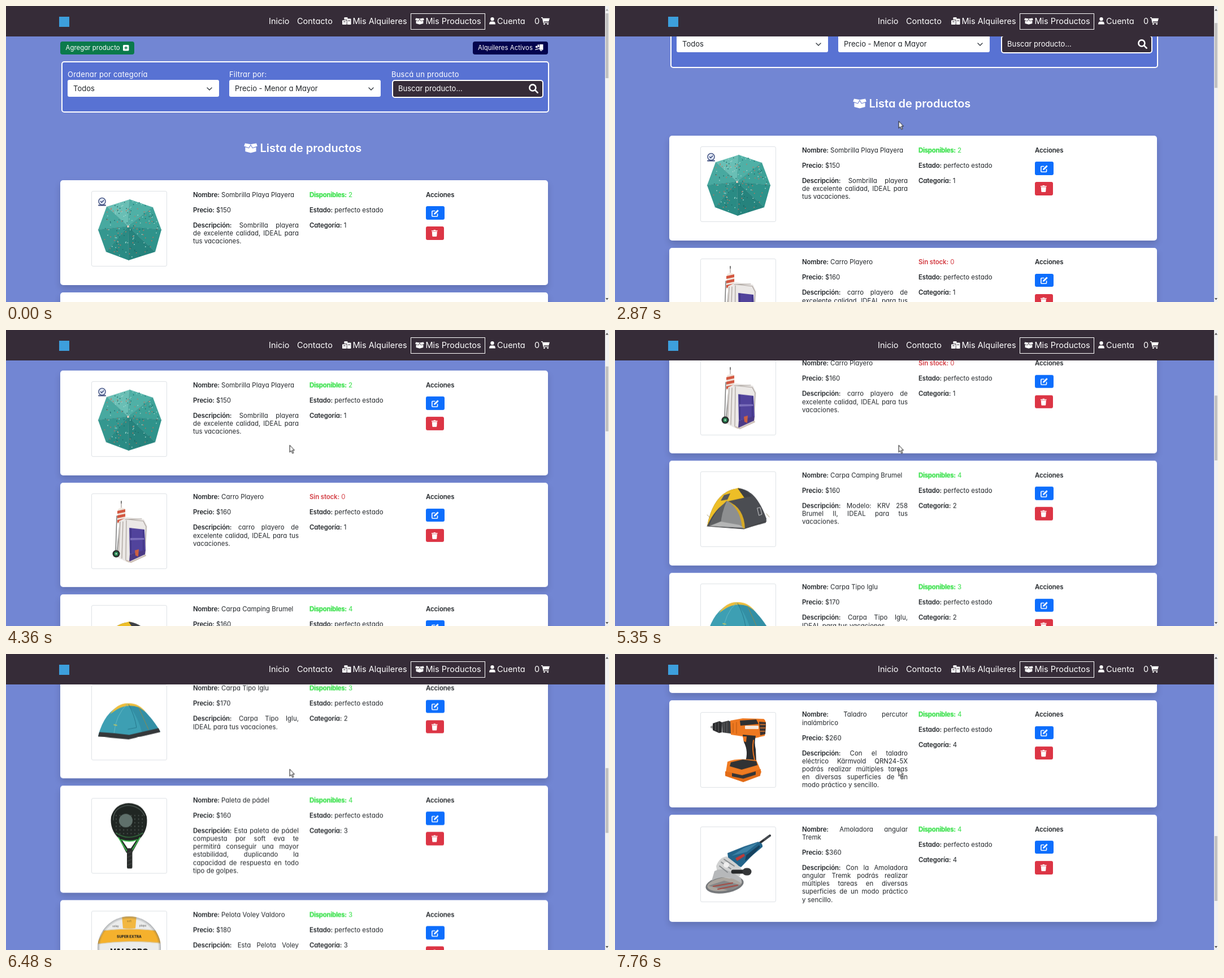
An HTML page for the animation above (8 s loop, 1067 px wide and 525 px high).

```html
<!DOCTYPE html>
<html lang="es">
<head>
<meta charset="utf-8">
<title>Mis Productos</title>
<style>
html, body { margin: 0; width: 100%; height: 100%; overflow: hidden; background: #7286d3; }
body { position: relative; font: 11.4px Inter, "Open Sans", sans-serif; font-feature-settings: "cv11"; letter-spacing: .003em; color: #212529; }
div, svg { position: absolute; box-sizing: border-box; }
svg { overflow: visible; }
b { font-weight: 600; letter-spacing: -.01em; }
#page { left: 0; top: 0; width: 1060px; height: 1960px; }
#head { left: 0; top: 0; width: 1060px; height: 54px; background: #362c38; }
#bar { left: 1060px; top: 0; width: 7px; height: 525px; background: #f1f1f1; }
#thumb { left: 1px; top: 13px; width: 5px; height: 115px; background: #c1c1c1; }
/* zero line height: the top offset is the baseline */
.t { line-height: 0; margin-top: -.364em; white-space: nowrap; }
.w { color: #fff; }
.nav { font-size: 14.5px; letter-spacing: 0; color: #fff; }
.label { font-size: 13px; letter-spacing: .015em; color: #fff; }
.field { font-size: 13px; letter-spacing: 0; }
.title { font-size: 20px; font-weight: 600; letter-spacing: 0; color: #fff; }
.full { width: 187px; text-align-last: justify; }
.in { color: #4ce45c; font-weight: 500; }
.in b { font-weight: 700; letter-spacing: -.025em; text-shadow: 0 0 1px #4ce45c; }
.out { color: #d33a40; }
.card { left: 96px; width: 863px; background: #fff; border-radius: 5px; box-shadow: 0 6px 12px rgba(0,0,0,.15); }
.frame { border: 1px solid #dee2e6; border-radius: 3px; background: #fff; }
</style>
</head>
<body>
<div id="page"></div>
<div id="head"></div>
<div id="bar">
  <div id="thumb"></div>
  <svg width="7" height="525"><path id="up" d="M1 8.5L3.5 5 6 8.5z"/><path d="M1 518L3.5 521.5 6 518z" fill="#505050"/></svg>
</div>
<svg id="cursor" width="10" height="17" viewBox="0 0 10 17"><path d="M.6.8V13.2L3.3 10.6 5.4 15.4 7.4 14.5 5.3 9.8H9z" fill="#fff" stroke="#111" stroke-width="1"/></svg>
<script>
const $ = id => document.getElementById(id);
const box = (x, y, w, h, css, cls = '') =>
  `<div class="${cls}" style="left:${x}px;top:${y}px;width:${w}px;height:${h}px;${css}"></div>`;
const text = (x, y, str, cls = '') => `<div class="t ${cls}" style="left:${x}px;top:${y}px">${str}</div>`;
const path = (d, fill, more = '') => `<path d="${d}" fill="${fill}" ${more}/>`;
const poly = (pts, fill) => path(`M${pts}Z`, fill);
const line = (d, color, width) =>
  path(d, 'none', `stroke="${color}" stroke-width="${width}" stroke-linecap="round" stroke-linejoin="round"`);
const dot = (x, y, r, fill) => `<circle cx="${x.toFixed(1)}" cy="${y.toFixed(1)}" r="${r}" fill="${fill}"/>`;
const ring = (x, y, r, color, width) => `<circle cx="${x}" cy="${y}" r="${r}" fill="none" stroke="${color}" stroke-width="${width}"/>`;
const rect = (x, y, w, h, fill, rx = 0) => `<rect x="${x}" y="${y}" width="${w}" height="${h}" rx="${rx}" fill="${fill}"/>`;
const ink = 'currentColor';

let seed = 7;
const rand = () => (seed = seed * 16807 % 2147483647) / 2147483647;

// name: [width, height, markup]
const icons = {
  open: [24, 18, path('M2 .6L12 2.2 8.5 8.2.2 5.6zM22 .6L12 2.2 15.5 8.2 23.8 5.6zM2.4 7.4L9 9.4 12 4.6 15 9.4 21.6 7.4V15L12 17.6 2.4 15z', ink)],
  boxes: [18, 15, rect(4, 0, 7, 5, ink, 1) + rect(0, 6, 9, 9, ink, 1) + rect(10, 3, 8, 12, ink, 1)
    + rect(2.5, 8.5, 4, 1.3, '#362c38') + rect(12, 6.5, 4, 1.3, '#362c38')],
  user: [14, 16, dot(7, 4, 4, ink) + path('M0 16Q0 9.5 5 9.5H9Q14 9.5 14 16z', ink)],
  cart: [18, 16, path('M0 0H3L3.6 2H18L16 9H5.5L5.8 10.7H16V12.3H4.4L2.2 1.7H0z', ink) + dot(6.5, 14.4, 1.6, ink) + dot(14, 14.4, 1.6, ink)],
  plus: [14, 14, rect(0, 0, 14, 14, ink, 2) + line('M7 4V10M4 7H10', '#0b7a4b', 1.8)],
  truck: [18, 15, path('M10 0H18V12H10z', ink) + dot(13.5, 12.5, 2.4, ink) + dot(13.5, 12.5, 1, '#03034d')
    + poly('1 4 5 3 6 7 2 8', ink) + poly('5.5 1 8.5 .3 9.3 5.8 6.5 6.5', ink) + line('M1 11.5L10 9.3', ink, 1.6)],
  search: [16, 16, ring(6.5, 6.5, 5.2, ink, 2.4) + line('M10.5 10.5L14.8 14.8', ink, 2.4)],
  down: [10, 6, line('M1 1L5 5 9 1', ink, 1.4)],
  edit: [16, 16, line('M7 3H2.5Q1 3 1 4.5V13.5Q1 15 2.5 15H11.5Q13 15 13 13.5V9.5', ink, 2) + path('M4.8 11.2L5.5 8 12.4 1.1Q13.2.4 14 1.1L15 2.1Q15.7 2.9 15 3.7L8 10.5z', ink)],
  trash: [14, 16, path('M0 1.4H4.5L5.2 0H8.8L9.5 1.4H14V3.2H0zM1 4.3H13L12.2 14.7Q12.1 16 10.8 16H3.2Q1.9 16 1.8 14.7z', ink)]
};
const icon = (name, x, y, width, color = '#fff') => {
  const [w, h, body] = icons[name];
  return `<svg style="left:${x}px;top:${y}px;color:${color}" width="${width}" height="${width * h / w}" viewBox="0 0 ${w} ${h}">${body}</svg>`;
};

// product pictures, 134 by 134
function umbrella() {
  const rim = [[68, 15], [109, 29], [124, 69], [113, 108], [66, 123], [26, 108], [12, 69], [27, 28]];
  const tones = ['#4fb0a6', '#3ea298', '#2f938b', '#26837d', '#2a8b84', '#34978f', '#48a9a0', '#69bfb5'];
  let out = rim.map((p, i) => poly([p, rim[(i + 1) % 8], [65, 63]], tones[i])).join('');
  for (let i = 0; i < 170; i++) {
    const a = rand() * 6.283, r = 51 * Math.sqrt(rand());
    out += dot(67 + r * Math.cos(a), 68 + r * Math.sin(a), .9, ['#c8745e', '#9fd6cd', '#1c6a68'][i % 3]);
  }
  out += rim.map(p => line(`M65 63L${p}`, '#257b76', .5)).join('') + dot(65, 63, 2, '#e3cfc0');
  return out + line('M13 25.5H25', '#3a4a7c', 2) + dot(19, 18.5, 6.8, '#3a4a7c') + dot(19, 18.5, 5.4, '#dfe6f4')
    + line('M16.5 18.5L18.3 20.5 21.8 16.8', '#3a4a7c', 1.5);
}

function beachCart() {
  const stripes = [0, 1, 2].map(i => poly([[46, 31 + i * 8], [60, 28 + i * 8], [60, 33 + i * 8], [46, 36 + i * 8]], '#d3563f')).join('');
  return line('M53 14V28', '#b5aaa6', 1.5) + line('M53 14V17', '#777', 2) + poly('47 28 53 25 60 27 61 54 46 54', '#f0e7df') + stripes
    + line('M45 40L43 106M50 55L45 112', '#777', 1.5)
    + poly('49 49 63 42 93 46 99 58 96 110 66 123 47 114', '#ebe8e6')
    + line('M51 50L48 112M56 50L54 115M62 48L61 118M65 46L92 49 97 59 94 109M60 46L89 45', '#a8a09a', 1.2)
    + poly('67 61 94 64 96 101 68 108', '#51439c') + line('M70 62V106M92 65V101', '#342c73', 1)
    + poly('69 79 93 79 94 82 69 83', '#7c70bc') + poly('68 108 96 100 95 108 67 121', '#4b3a85')
    + poly('77 101 84 99 83 112 78 110', '#cc6042') + line('M62 119L70 122 96 110', '#c9b9ae', 2)
    + dot(44, 107, 6.5, '#262b2a') + dot(44, 107, 3.7, '#2a9158') + dot(44, 107, 1.3, '#ddd');
}

function tent() {
  return path('M12 97Q23 39 61 31Q96 25 117 84L116 91 77 102z', '#4b4d52')
    + path('M12 97Q23 39 61 31L68 29Q76 33 85 45L49 53Q26 65 12 97z', '#edbe27')
    + poly('42 42 53 39 48 50 36 52', '#56585a') + path('M66 30Q78 29 91 44L78 47z', '#3e4045')
    + path('M47 52Q25 72 16 97L77 100Q73 66 47 52z', '#8d8f90') + path('M47 52Q37 74 36 95L16 97Q25 72 47 52z', '#5d5f61')
    + path('M47 52Q78 64 79 102L74 100Q71 66 47 52z', '#d5a927') + poly('36 89 69 95 77 100 16 97', '#b5b6b6')
    + line('M12 97L77 102 117 88', '#3c3d3f', 1.2) + line('M101 65L106 64 109 76 104 78z', '#c9cacc', 1)
    + line('M12 77L17 82M117 75L122 81', '#99875a', .8);
}

function igloo() {
  return path('M12 91Q23 48 54 35Q77 30 93 47Q108 62 122 83L66 96z', '#3d9fb3')
    + path('M63 34Q83 54 91 91L122 83Q106 56 87 40Q75 33 63 34z', '#338fa5')
    + path('M33 52Q47 32 65 33Q83 32 96 48L84 40Q64 33 45 44z', '#eebd3b') + line('M64 34Q43 53 40 87', '#69bac8', .9)
    + line('M66 35Q77 55 80 76L65 79', '#236f83', .8) + line('M84 41L101 79', '#8e8b4e', 1)
    + poly('14 84 41 86 67 89 119 77 122 84 66 97 12 92', '#35383a') + line('M40 71L45 72', '#d4cb54', 1.5);
}

function paddle() {
  let holes = '';
  for (let r = 0; r < 6; r++) for (let c = 0; c < 8; c++)
    holes += dot(44 + c * 6.6, 31 + r * 6.4, 1.1, '#4d5652');
  return path('M66 9Q91 10 98 33Q101 56 86 72L72 97H62L49 72Q32 56 35 33Q42 10 66 9z', '#202623')
    + line('M39 39Q38 17 64 13Q86 14 94 31', '#596560', 1.2) + holes + dot(61, 40, 12, '#5f706b')
    + path('M54 74Q67 79 80 74L68 92H66z', '#fff')
    + line('M48 70L63 94M86 70L71 94M53 74Q67 79 81 74', '#3fc451', 1.8) + line('M44 62Q66 77 91 62', '#3c8948', 1.2)
    + rect(63, 89, 9.5, 36, '#292c2b', 2) + line('M64 98L71 95M64 105L71 102M64 112L71 109M64 119L71 116', '#565a58', .8);
}

function ball() {
  const print = (x, y, size, str, more = '') =>
    `<text x="${x}" y="${y}" font-size="${size}" text-anchor="middle" letter-spacing="0" ${more}>${str}</text>`;
  return '<defs><clipPath id="round"><circle cx="67" cy="66" r="56"/></clipPath></defs><g clip-path="url(#round)">'
    + dot(67, 66, 56, '#ebecec') + path('M54 8H80L78 31Q67 33 56 31z', '#f2b741')
    + path('M22 35Q67 30 114 35L125 58Q67 51 9 59z', '#f5b12d')
    + path('M10 82Q67 91 124 82L111 105Q66 111 24 105z', '#1b4c9c')
    + path('M54 108Q67 110 80 107L84 124H50z', '#efb23b')
    + line('M19 35Q67 29 116 35M9 59Q67 51 125 57M9 82Q67 91 125 82M23 105Q67 112 112 105', '#c9c9c5', .8)
    + ring(67, 66, 56, 'rgba(90,95,100,.18)', 8) + ring(67, 66, 56, 'rgba(90,95,100,.3)', 3)
    + '</g>' + print(67, 47.5, 6.3, 'SUPER EXTRA', 'font-weight="800" fill="#222"')
    + print(67, 77, 13.5, 'VALDORO', 'font-weight="900" fill="#111"')
    + print(67, 83, 3, 'PELOTA OFICIAL', 'fill="#333"') + print(43, 29, 4.5, 'voley', 'fill="#444"') + print(91, 28, 4.5, 'playa', 'fill="#444"')
    + print(67, 20, 4.5, 'soft', 'fill="#8b6b2c"');
}

function drill() {
  return poly('18 25 24 23 24 30 18 28', '#999') + poly('22 20 34 16 38 18 38 36 33 37 22 32', '#292a2c')
    + poly('38 18 50 15 54 17 54 38 39 36', '#3b3c3e') + line('M27 20V32M32 18V35M42 19V35M47 18V36', '#666', 1)
    + path('M53 15L75 11 112 12Q117 15 116 26L114 42 93 47 75 43 54 40z', '#ee7820')
    + poly('70 15 99 13 103 21 71 24', '#2e3032') + poly('104 17 116 18 115 39 106 41', '#3a3230')
    + rect(79, 24, 24, 6, '#f7e8dc', 1) + line('M106 22H115M106 28H115M106 34H114', '#e27a2c', 1.4) + line('M58 20V36M64 18V38', '#b9560f', 1)
    + path('M75 40L98 42Q95 54 98 66L99 88 79 90Q86 70 77 53z', '#2c2d2f') + poly('75 43 82 43 81 53 77 52', '#eb741e')
    + line('M94 50Q91 66 96 84', '#e3701e', 2)
    + path('M48 88Q64 81 99 85L108 106 105 113 76 124 44 113z', '#ef7b22') + path('M54 89L75 84 99 87 101 94 73 102 52 96z', '#303234')
    + poly('44 105 73 111 107 101 106 113 76 124 44 113', '#e36c17') + poly('56 108 74 112 98 105 98 111 76 118 56 114', '#343638');
}

function grinder() {
  return line('M123 16L104 30', '#292e34', 4) + line('M122 17L113 23', '#50555a', 2)
    + path('M102 27Q111 29 110 36L91 52 72 72 50 62 48 47 78 35z', '#23648a') + path('M103 28L77 38 55 52 82 45z', '#3d82a6')
    + poly('81 51 104 33 106 36 91 52 79 61', '#16425f') + poly('62 56 77 48 79 52 65 61', '#bd3a38')
    + `<ellipse cx="43" cy="103" rx="34" ry="15" transform="rotate(-9 43 103)" fill="#74777a"/>`
    + `<ellipse cx="43" cy="102" rx="31" ry="12" transform="rotate(-9 43 102)" fill="#aaa59f"/>`
    + poly('14 105 42 96 72 104 50 113', '#858788') + line('M23 106L57 100M31 111L66 104', '#a54a42', 2)
    + path('M28 70Q34 54 47 53L65 67 73 75 70 88 52 92 31 88z', '#d0d1d1') + path('M25 79Q39 71 59 83L72 91 73 101Q47 82 20 96z', '#b6b8ba')
    + line('M37 63L54 75M42 58L60 70M34 70L48 81', '#85898c', 1.7) + dot(46, 68, 5, '#eee')
    + line('M58 80L81 80', '#26282a', 7) + line('M81 80L84 80', '#343638', 13);
}

const idealTail = 'IDEAL para tus';
const products = [
  [['Sombrilla Playa Playera'], 150, 2, 1, ['Sombrilla playera', 'de excelente calidad, IDEAL para', 'tus vacaciones.'], umbrella],
  [['Carro Playero'], 160, 0, 1, ['carro playero de', 'excelente calidad, ' + idealTail, 'vacaciones.'], beachCart],
  [['Carpa Camping Brumel'], 160, 4, 2, ['Modelo: KRV 258', 'Brumel II, ' + idealTail, 'vacaciones.'], tent],
  [['Carpa Tipo Iglu'], 170, 3, 2, ['Carpa Tipo Iglu,', idealTail + ' vacaciones.'], igloo],
  [['Paleta de pádel'], 160, 4, 3, ['Esta paleta de pádel', 'compuesta por soft eva te', 'permitirá conseguir una mayor',
    'estabilidad, duplicando la', 'capacidad de respuesta en todo', 'tipo de golpes.'], paddle],
  [['Pelota Voley Valdoro'], 180, 3, 3, ['Esta Pelota Voley', 'Valdoro compuesta por soft eva te', 'permitirá conseguir una mayor', 'estabilidad'], ball],
  [['Taladro percutor', 'inalámbrico'], 260, 4, 4, ['Con el taladro', 'eléctrico Kärmvold QRN24-5X', 'podrás realizar múltiples tareas',
    'en diversas superficies de un', 'modo práctico y sencillo.'], drill],
  [['Amoladora angular', 'Tremk'], 360, 4, 4, ['Con la Amoladora', 'angular Tremk podrás realizar', 'múltiples tareas en diversas',
    'superficies de un modo práctico', 'y sencillo.'], grinder]
];

const leading = 14.2;
const block = (x, y, label, lines) => lines.map((s, i) =>
  text(x, y + i * leading, (i ? '' : `<b>${label}:</b> `) + s, i < lines.length - 1 ? 'full' : '')).join('');

function card([name, price, stock, category, about, picture], top) {
  const tall = name.length + about.length > 5;
  const height = tall ? 190.3 : 185.7;
  const y = top + 30, shift = (name.length - 1) * leading, pic = top + (height - 147) / 2;
  const html = box(96, top, 863, height, '', 'card') + box(151, pic, 134, 134, '', 'frame')
    + `<svg style="left:151px;top:${pic}px" width="134" height="134">${picture()}</svg>`
    + block(331, y, 'Nombre', name) + block(331, y + 27 + shift, 'Precio', ['$' + price])
    + block(331, y + 54 + shift, 'Descripción', about)
    + text(537, y, stock ? `<b>Disponibles:</b> ${stock}` : '<b>Sin stock:</b> 0', stock ? 'in' : 'out')
    + block(537, y + 27, 'Estado', ['perfecto estado']) + block(537, y + 54, 'Categoría', [category])
    + text(743, y, '<b>Acciones</b>')
    + box(743, top + 46, 33, 23.5, 'background:#0d6efd;border-radius:3px') + icon('edit', 753, top + 51.5, 13)
    + box(743, top + 82.3, 32, 23.5, 'background:#dc3545;border-radius:3px') + icon('trash', 753.3, top + 88, 10.6);
  return [html, height];
}

const select = (x, value) => box(x, 131, 267.5, 30, 'background:#fff;border-radius:3px')
  + text(x + 10, 150.5, value, 'field') + icon('down', x + 246, 143.5, 10, '#343a40');

let html = box(96, 63, 131, 23, 'background:#0b7a4b;border-radius:4px') + text(105.5, 78.5, 'Agregar producto', 'w') + icon('plus', 207, 69, 10.5)
  + box(826, 63, 133, 23, 'background:#03034d;border-radius:4px') + text(835, 78.5, 'Alquileres Activos', 'w') + icon('truck', 936, 68, 14.5)
  + box(97.5, 98, 863, 91, 'background:#5872d3;border:2px solid #fff;border-radius:5px')
  + text(109, 126, 'Ordenar por categoría', 'label') + text(395, 126, 'Filtrar por:', 'label') + text(682, 126, 'Buscá un producto', 'label')
  + select(109, 'Todos') + select(395, 'Precio - Menor a Mayor')
  + box(682.5, 131, 268, 32, 'background:#362c38;border:2px solid #fff;border-radius:5px')
  + text(694, 151, 'Buscar producto...', 'field w') + icon('search', 925, 138, 17)
  + icon('open', 420.5, 243, 24) + text(449.5, 259.5, 'Lista de productos', 'title');
let top0 = 309;
for (const p of products) {
  const [body, height] = card(p, top0);
  html += body;
  top0 += height + 12.8;
}
$('page').innerHTML = html;

$('head').innerHTML = box(94, 19, 18, 18, 'background:#3d9fdc')
  + text(465, 32, 'Inicio', 'nav') + text(515, 32, 'Contacto', 'nav')
  + icon('boxes', 595, 20, 15.5) + text(613.5, 32, 'Mis Alquileres', 'nav')
  + box(716, 12.5, 132, 29.5, 'border:1px solid #fff') + icon('open', 723.5, 20.5, 16) + text(742.5, 32.5, 'Mis Productos', 'nav')
  + icon('user', 855, 20, 11) + text(869, 32, 'Cuenta', 'nav') + text(935, 32, '0', 'nav') + icon('cart', 947, 20, 15);

const loop = 8000;
// table rows are [time, value]; each value holds until the next row
function play(el, table, style) {
  const frames = table.map(([time, value]) => ({ offset: time / loop, easing: 'step-end', ...style(value) }));
  frames.push({ ...frames[frames.length - 1], offset: 1 });
  el.animate(frames, { duration: loop, iterations: Infinity });
}

// scroll position in wheel notches
const notches = [[0, 0], [2870, 1], [3240, 0], [3970, 1]];
[4230, 4360, 5090, 5290, 5350, 5750, 5820, 5890, 6350, 6480, 6680, 6740, 7270, 7400, 7600, 7680, 7760]
  .forEach((time, i) => notches.push([time, i + 2]));
const notch = 79.05;
play($('page'), notches, n => ({ transform: `translateY(${-n * notch}px)` }));
play($('thumb'), notches, n => ({ transform: `translateY(${n * notch * .2178}px)` }));
play($('up'), notches, n => ({ fill: n ? '#505050' : '#a3a3a3' }));

const moves = [[0, [1100, 540]]];
[200, 280, 360, 440, 530, 610, 690].forEach((time, i) => {
  const left = (1 - i / 6) ** 1.6;
  moves.push([time, [581 + 396 * left, 203.5 + 300 * left]]);
});
moves.push([1480, [538, 203.5]], [1550, [501.5, 203.5]]);
play($('cursor'), moves, ([x, y]) => ({ transform: `translate(${x}px,${y}px)` }));
</script>
</body>
</html>
```
